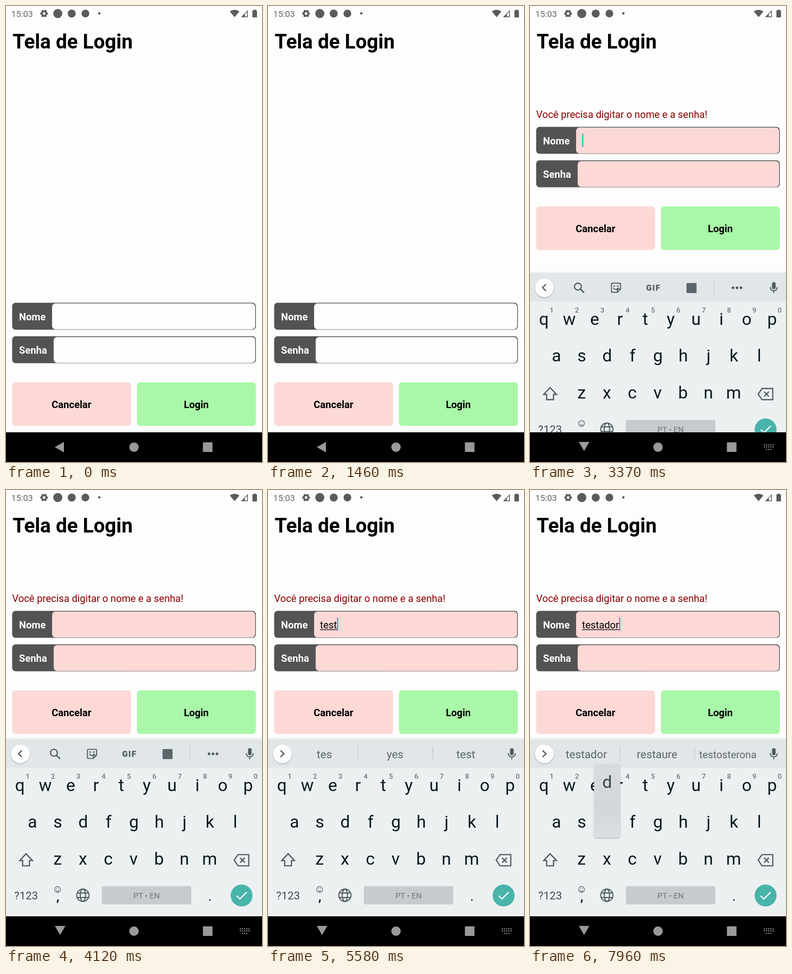
Animation, 561 px wide and 998 px high, one loop 8000 ms. Source, as an HTML page:

```html
<!DOCTYPE html>
<html lang="pt">
<head>
<meta charset="utf-8">
<title>Tela de Login</title>
<style>
  html, body { margin: 0; width: 100%; height: 100%; overflow: hidden; background: #fdfdfd; }
  svg { display: block; width: 100vw; height: 100vh; }
  text { font-family: Roboto, sans-serif; font-size: 21.85px; white-space: pre; }
  .bold { font-weight: 700; }
  .mid { text-anchor: middle; }
  .line { fill: none; stroke: #4f5b63; stroke-width: 2.6; }
  .key { font-size: 37.5px; fill: #07191f; text-anchor: middle; }
  .hint { font-size: 15.5px; font-weight: 500; fill: #6d767a; text-anchor: middle; }
  .word { font-size: 24.3px; fill: #5b666c; text-anchor: middle; }
</style>
</head>
<body>
<svg viewBox="0 0 561 998">
  <defs>
    <clipPath id="aboveNav"><path d="M0 0H561V933H0z"/></clipPath>
    <linearGradient id="popFill" x2="0" y2="1">
      <stop stop-color="#d9dcde"/><stop offset=".6" stop-color="#d3d6d8"/><stop offset="1" stop-color="#dde0e2"/>
    </linearGradient>
    <linearGradient id="edge" x2="0" y2="1">
      <stop stop-color="#000" stop-opacity="0"/><stop offset="1" stop-color="#000" stop-opacity=".07"/>
    </linearGradient>
    <filter id="shadow" x="-30%" y="-30%" width="160%" height="160%">
      <feDropShadow dx="0" dy="1.5" stdDeviation="1.8" flood-opacity=".28"/>
    </filter>
  </defs>
  <rect width="561" height="998" fill="#fdfdfd"/>

  <g id="status" fill="#5b5b5b">
    <text x="11.5" y="24" style="font-size:19.1px" fill="#666">15:03</text>
    <circle cx="83.5" cy="16.5" r="4.9" fill="none" stroke="#5b5b5b" stroke-width="4"/>
    <circle cx="83.5" cy="16.5" r="7.2" fill="none" stroke="#5b5b5b" stroke-width="2.6" stroke-dasharray="3.77" stroke-dashoffset="1.9"/>
    <circle cx="113.5" cy="16.5" r="10"/>
    <circle cx="144" cy="16.5" r="8.8"/>
    <circle cx="174" cy="16.5" r="8.5"/>
    <circle cx="204.5" cy="16" r="2.6"/>
    <path d="M501 24.5L490.5 12Q501 4.5 511.5 12z"/>
    <path d="M515 24.5L530 9V24.5z M523.5 17.8V22.8H528.4V12.8z" fill-rule="evenodd"/>
    <path d="M542.8 8H547.2V9.6H549Q550 9.6 550 10.6V24Q550 25 549 25H541Q540 25 540 24V10.6Q540 9.6 541 9.6H542.8z"/>
  </g>
  <text x="14.5" y="92.5" class="bold" style="font-size:43.7px">Tela de Login</text>

  <g id="form">
    <text id="error" x="13.5" y="629.5" fill="#8b0000">Você precisa digitar o nome e a senha!</text>
    <g id="fields"></g>
    <text id="typed" x="114" y="688"></text>
    <rect id="underline" x="114" y="690" height="1.4"/>
    <rect id="caret" y="664.5" width="2.7" height="29" fill="#12c9b5"/>
    <rect x="13.5" y="823.5" width="260.5" height="95.5" rx="7" fill="#fdd9d6"/>
    <rect x="287" y="823.5" width="260.5" height="95.5" rx="7" fill="#a9f7a8"/>
    <text x="143.5" y="879.7" class="bold mid">Cancelar</text>
    <text x="417" y="879.7" class="bold mid">Login</text>
  </g>

  <g clip-path="url(#aboveNav)">
    <g id="keyboard">
      <rect y="541" width="561" height="5" fill="url(#edge)"/>
      <rect y="546" width="561" height="387" fill="#ecf0f1"/>
      <rect y="546" width="561" height="62" fill="#e1e6e8"/>
      <circle cx="31.5" cy="577.5" r="20.3" fill="#fdfdfd" filter="url(#shadow)"/>
      <path id="chevron" class="line"/>
      <g id="tools">
        <circle cx="105" cy="575" r="7.5" class="line"/>
        <path d="M110.5 580.5L118.5 588.5" class="line" style="stroke-width:3"/>
        <path d="M180.5 567.5H196.500Q198.500 567.500 198.500 569.500V580.500L191.500 587.500H180.500Q178.500 587.500 178.500 585.500V569.500Q178.500 567.500 180.500 567.500z M198 580.500H191.500V587 M183 578Q188.500 585 194 577" class="line" style="stroke-width:2.2"/>
        <circle cx="184.500" cy="573.500" r="1.700" fill="#4f5b63"/><circle cx="192.500" cy="573.500" r="1.700" fill="#4f5b63"/>
        <text x="270.500" y="583.500" class="mid" style="font-size:18px;font-weight:900;letter-spacing:1.5px" fill="#4f5b63">GIF</text>
        <rect x="343" y="567" width="22" height="22" rx="2" fill="#5a656c"/>
        <path d="M403.500 562V594" stroke="#c9ced1" stroke-width="1.400"/>
        <g fill="#4f5b63"><circle cx="445" cy="577.500" r="2.900"/><circle cx="453.700" cy="577.500" r="2.900"/><circle cx="462.400" cy="577.500" r="2.900"/></g>
      </g>
      <g id="words">
        <path d="M197 561V594M361 561V594" stroke="#c4c9cc" stroke-width="1.400"/>
        <text x="123.500" y="587" class="word"></text>
        <text x="278.500" y="587" class="word"></text>
        <text x="433.500" y="587" class="word"></text>
      </g>
      <rect x="530.300" y="565" width="8" height="15.500" rx="4" fill="#4f5b63"/>
      <path d="M526.500 576Q527 584 534.300 584T542 576M534.300 584V589.500" class="line" style="stroke-width:2.200"/>
      <g id="keys"></g>
      <path d="M44 796L58 811H51.500V822.500H36.500V811H30z" class="line"/>
      <path d="M500 810L508.500 798H532V822.500H508.500z M513 805L523.500 815.500M523.500 805L513 815.500" class="line"/>
      <text x="44" y="896" class="mid" style="font-size:24px" fill="#3c4a52">?123</text>
      <circle cx="113" cy="874.500" r="6.500" class="line" style="stroke-width:1.300"/>
      <path d="M109.500 876.500Q113 880.500 116.500 876.500M110.600 871.500V873.300M115.400 871.500V873.300" class="line" style="stroke-width:1.300"/>
      <text x="113.500" y="899" class="key" style="font-size:30px;font-weight:500">,</text>
      <g class="line" style="stroke-width:2.300">
        <circle cx="168.500" cy="887" r="13.500"/><ellipse cx="168.500" cy="887" rx="5.800" ry="13.500"/>
        <path d="M156.500 882H180.500M156.500 892H180.500"/>
      </g>
      <rect x="210" y="867" width="196" height="40" rx="4" fill="#c6cbce"/>
      <text x="308" y="893.500" class="mid" style="font-size:17.300px" fill="#69747a">PT • EN</text>
      <text x="447" y="899" class="key" style="font-size:30px">.</text>
      <circle cx="516.300" cy="887.500" r="24" fill="#48b4aa"/>
      <path d="M505.500 888L512.500 895L527.500 880" class="line" style="stroke:#fff"/>
      <g id="popup">
        <rect x="-28.500" y="-140" width="57" height="162" rx="5" fill="url(#popFill)" filter="url(#shadow)"/>
        <text y="-87" class="key" style="fill:#33434a"></text>
      </g>
    </g>
  </g>

  <rect y="933" width="561" height="65"/>
  <g fill="#999">
    <path id="back"/>
    <circle cx="280.500" cy="965.500" r="10.300"/>
    <rect x="431.500" y="955" width="21" height="21" rx="1"/>
    <path id="switcher" d="M512.500 960.500H534M512.500 965H534M517 970.500H529.500" fill="none" stroke="#999" stroke-width="2.400" stroke-dasharray="2.400 2.300"/>
  </g>
</svg>
<script>
const LOOP = 8000, ERROR_AT = 2100, FOCUS_AT = 3200, SHIFT_AT = 3300, SLIDE = 250, BLINK = 500;
// time of commit, letter; the last key is still held down when the loop ends
const strokes = [[4450, 't'], [4740, 'e'], [5020, 's'], [5330, 't'],
  [6150, 'a'], [6650, 'd'], [7250, 'o'], [7620, 'r'], [8040, 'd']];
const suggestions = ['', 't te tem', 'te tem ter', 'tes teste tese', 'tes yes test',
  'testa testar teste', 'testad testes testis', 'testado testada testando',
  'testador restaure testosterona'].map(s => s.split(' '));
const rows = [['qwertyuiop', 30.5, 659], ['asdfghjkl', 58, 739], ['zxcvbnm', 113, 819.5]];

const $ = id => document.getElementById(id);
const show = (el, on) => el.setAttribute('visibility', on ? 'inherit' : 'hidden');
const keyPos = {};

$('keys').innerHTML = rows.map(([letters, x0, y], row) => [...letters].map((c, i) => {
  const x = x0 + 55.55 * i;
  keyPos[c] = [x, y];
  const hint = row ? '' : `<text x="${x + 16.8}" y="632" class="hint">${(i + 1) % 10}</text>`;
  return `<text x="${x}" y="${y}" class="key">${c}</text>${hint}`;
}).join('')).join('');

$('fields').innerHTML = [['Nome', 649.5, 101], ['Senha', 722.8, 104.5]].map(([label, y, x]) => `
  <rect x="13.5" y="${y}" width="534" height="59" rx="7.5" fill="#535355"/>
  <rect class="input" x="${x}" y="${y + 1.6}" width="${546 - x}" height="56.6" rx="7.5"/>
  <text x="28.5" y="${y + 38.3}" class="bold" fill="#fff">${label}</text>`).join('');

const inputs = document.querySelectorAll('.input');
const words = document.querySelectorAll('.word');
const popupText = $('popup').querySelector('text');

function draw(t) {
  const done = strokes.filter(s => s[0] <= t);
  const count = done.length;
  const value = done.map(s => s[1]).join('');
  const failed = t >= ERROR_AT, open = t >= FOCUS_AT, shifted = t >= SHIFT_AT;

  show($('error'), failed);
  inputs.forEach(el => el.setAttribute('fill', failed ? '#fdd9d6' : '#fdfdfd'));
  $('form').setAttribute('transform', `translate(0 ${shifted ? -385 : 0})`);

  $('typed').textContent = value;
  const width = count ? $('typed').getComputedTextLength() : 0;
  $('underline').setAttribute('width', width);
  $('caret').setAttribute('x', 114 + width);
  const since = t - (count ? done[count - 1][0] : FOCUS_AT);
  show($('caret'), open && Math.floor(since / BLINK) % 2 === 0);

  const p = Math.min(1, Math.max(0, (t - FOCUS_AT) / SLIDE));
  $('keyboard').setAttribute('transform', `translate(0 ${392 * (1 - p) ** 2})`);
  show($('keyboard'), open);
  show($('switcher'), open);
  $('back').setAttribute('d', open ? 'M107 954H130L118.500 974z' : 'M107 965.500L127 954V977z');

  show($('tools'), !count);
  show($('words'), count);
  $('chevron').setAttribute('d', count ? 'M27.500 570L35 577.200L27.500 584.400' : 'M35 570L27.500 577.200L35 584.400');
  words.forEach((el, i) => {
    const word = suggestions[count][i] || '';
    el.textContent = word;
    el.style.fontSize = word.length > 10 ? '22.3px' : '';
  });

  const held = strokes.find(([at]) => t >= at - 110 && t < at + 30);
  show($('popup'), held);
  if (held) {
    popupText.textContent = held[1];
    $('popup').setAttribute('transform', `translate(${keyPos[held[1]]})`);
  }
}

function tick() {
  draw(performance.now() % LOOP);
  requestAnimationFrame(tick);
}
tick();
</script>
</body>
</html>
```
